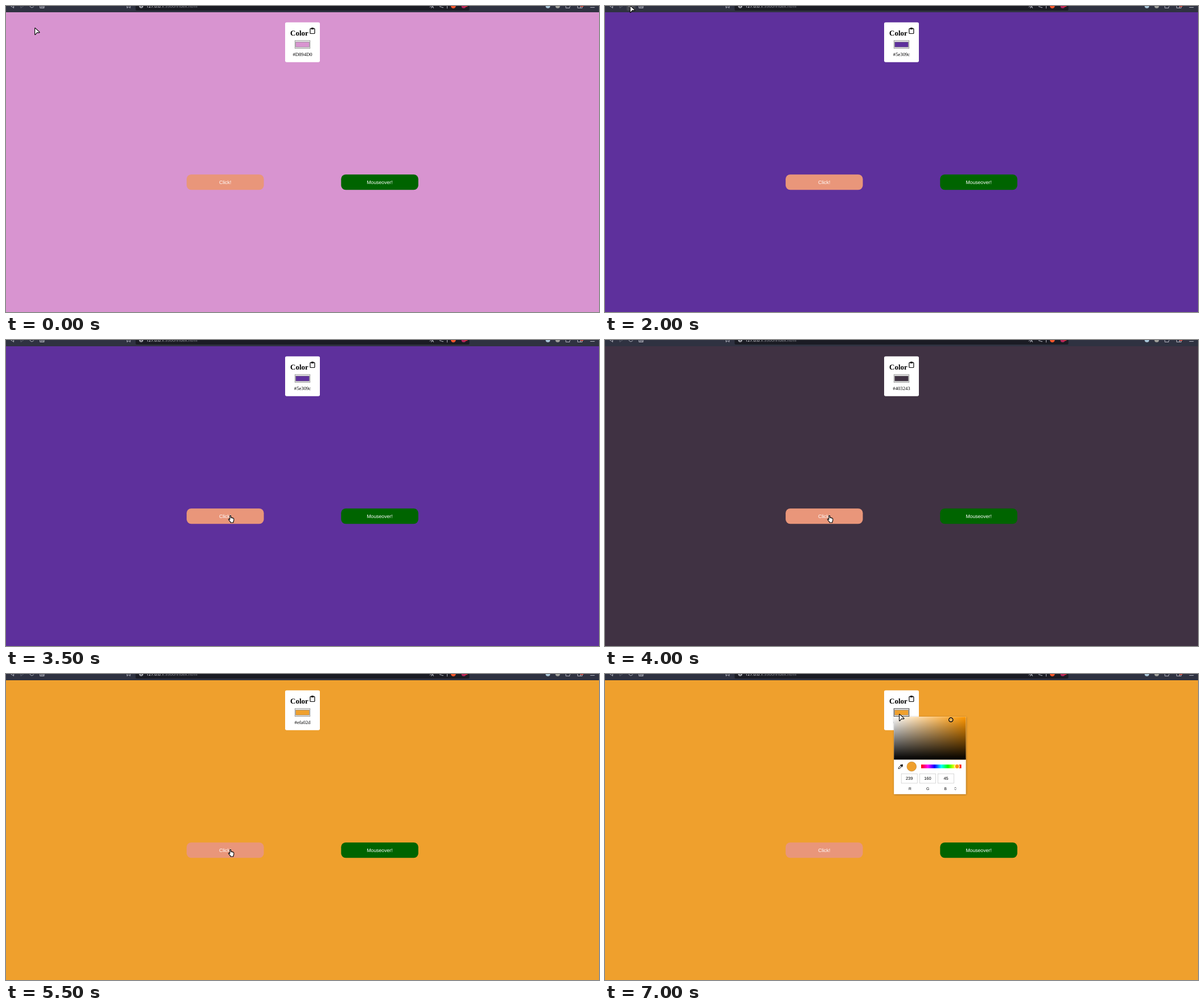
Write an HTML page that moves like this. It is 1041 px wide and 538 px high and loops after 8 s.

```html
<!DOCTYPE html>
<html lang="en">
<head>
<meta charset="utf-8">
<title>Color changer</title>
<style>
  html, body { margin: 0; width: 100%; height: 100%; overflow: hidden; }
  svg { display: block; width: 100%; height: 100%; }
  text { text-rendering: geometricPrecision; text-anchor: middle; }
  .sans { font-family: "Liberation Sans", Arial, sans-serif; }
  .serif { font-family: "Liberation Serif", "Times New Roman", serif; }
  .url { font: 7.4px "Noto Sans", sans-serif; text-anchor: start; }
  .icon { fill: none; stroke: #c3c5ce; stroke-width: .9; stroke-linejoin: round; stroke-linecap: round; }
  .cursor { fill: #fff; stroke: #000; stroke-width: 1.1; stroke-linejoin: round; }
</style>
</head>
<body>
<svg viewBox="0 0 1041 538">
  <defs>
    <linearGradient id="saturation"><stop stop-color="#fff"/><stop offset="1" stop-color="#ff9700"/></linearGradient>
    <linearGradient id="value" x2="0" y2="1"><stop stop-opacity="0"/><stop offset="1"/></linearGradient>
    <linearGradient id="hue"></linearGradient>
    <filter id="shadow" x="-10%" y="-10%" width="120%" height="120%">
      <feDropShadow dx=".5" dy=".8" stdDeviation="1.8" flood-opacity=".4"/>
    </filter>
  </defs>

  <rect id="page" width="1041" height="538"/>

  <!-- browser toolbar -->
  <rect width="1041" height="11" fill="#2f3241"/>
  <rect id="reloadHover" x="38" y="-6" width="15.5" height="14" rx="2" fill="#44464f"/>
  <path d="M227.500-5V6q0 2 2 2H811.500q2 0 2-2V-5z" fill="#1b1c24"/>
  <g class="icon">
    <path d="M13.500-4V3.500L8 -.5z"/>
    <path d="M26-4V3.500L31.500-.5z" opacity=".35"/>
    <path d="M48.500 1A3.500 3.500 0 1 1 48-3"/>
    <path d="M60-3H67V3.500H60zM62 3.500V0H65V3.500"/>
    <path d="M212.500-4V3.500L215.300 1.500L218 3.500V-4"/>
    <path d="M743.500-1L747-3M744 2L747-1M746.500 3.500L748.500-1L750.500 3.500M747.300 2H749.800"/>
    <path d="M761.500 1L766.500 2.600M761.500 0L767-2M766.500 2.600h1"/>
    <path d="M774.500-4V4"/>
    <path d="M982.800-2.500V3.500H989.500V1.500A1.300 1.300 0 0 0 989.500-1V-3"/>
    <path d="M1003.800-3H1011.500V3.500H1003.800zM1008.500-3V3.500"/>
    <path d="M1026-.5H1033M1026 2.500H1033"/>
  </g>
  <circle cx="237.300" cy="0" r="3.700" fill="#a4a5ac"/>
  <path d="M237.300-1V2" stroke="#1b1c24"/>
  <text class="url" x="246" y="2.800" fill="#e8e8ec">127.0.0.1<tspan fill="#8b8c94">:5500/index.html</tspan></text>
  <circle cx="785.300" cy="0" r="4.300" fill="#f0552b"/>
  <circle cx="803.500" cy="0" r="4" fill="#b3265c"/>
  <rect x="804.500" y="-5" width="6" height="6.500" rx="2" fill="#d8303a"/>
  <circle cx="951.300" cy="0" r="4" fill="#a9c5d6"/>
  <circle cx="968.500" cy="0" r="4" fill="#a0a09b"/>
  <rect x="1008" y="-5" width="6" height="6.500" rx="2" fill="#e0483c"/>

  <!-- color card -->
  <rect x="490" y="28.800" width="61" height="70" rx="2.700" fill="#fff"/>
  <text class="serif" x="515" y="52.300" font-size="13" font-weight="bold">Color</text>
  <g fill="none" stroke="#000" stroke-width="1.200">
    <rect x="533.900" y="39.700" width="8" height="8.800" rx="1"/>
    <rect x="536" y="38.400" width="3.800" height="2.400" rx=".6" fill="#000" stroke-width=".6"/>
  </g>
  <rect id="input" x="507.200" y="60.800" width="26.600" height="13.800" fill="#efefef"/>
  <rect id="swatch" x="508.700" y="63.200" width="23.600" height="9" stroke="#777" stroke-width=".6"/>
  <text id="code" class="serif" x="520.500" y="88" font-size="8.670"></text>

  <!-- buttons -->
  <g class="sans" font-size="8.670" fill="#fff">
    <rect x="317.100" y="296.200" width="135.500" height="27.100" rx="8.100" fill="#e9967a"/>
    <text x="384.800" y="312.800">Click!</text>
    <rect x="588.300" y="296.200" width="135.500" height="27.100" rx="8.100" fill="#006400"/>
    <text x="656" y="312.800">Mouseover!</text>
  </g>

  <!-- color picker popup -->
  <g id="picker">
    <rect x="507.200" y="75" width="126.300" height="136.200" fill="#fff" filter="url(#shadow)"/>
    <rect x="507.200" y="75.200" width="126.300" height="75.300" fill="url(#saturation)"/>
    <rect x="507.200" y="75.200" width="126.300" height="75.300" fill="url(#value)"/>
    <circle cx="607.200" cy="80.500" r="3.500" fill="#efa02d" stroke="#000" stroke-width="1.500"/>
    <circle cx="607.200" cy="80.500" r="2.300" fill="none" stroke="#fff" stroke-width=".6"/>
    <path d="M515.300 166.500V164.800L519.300 160.800L520.900 162.400L516.900 166.500z" fill="none" stroke="#000"/>
    <path d="M518.600 159.500L522.300 163.200M520.700 161.200L521.800 160" stroke="#000" stroke-width="1.300"/>
    <circle cx="521.500" cy="160.200" r="1.500"/>
    <circle cx="538.300" cy="162.700" r="8.300" fill="#efa02d" stroke="#b77a22" stroke-width=".6"/>
    <rect x="555" y="159.200" width="70.500" height="6.500" fill="url(#hue)"/>
    <circle cx="618" cy="162.400" r="4" fill="#ff9700" stroke="#fff" stroke-width="1.200"/>
    <g id="channels" class="sans"></g>
    <path d="M613.500 200.700L615 199.200L616.500 200.700M613.500 202.300L615 203.800L616.500 202.300" fill="none" stroke="#222" stroke-width=".8"/>
  </g>

  <path id="arrow" class="cursor" d="M.6 1.200Q.6 .3 1.400 .8L8.700 7.600Q9.400 8.700 8.200 8.900H4.800Q4.200 9 3.800 9.500L1.600 12.300Q.7 13 .6 11.900z"/>
  <path id="hand" class="cursor" d="M2.900 7.800V1.700Q2.900 .6 3.900 .6T4.900 1.700V4.800Q5 4 5.900 4.200T6.700 5Q6.900 4.400 7.600 4.600T8.400 5.500Q8.800 5 9.400 5.400T9.900 6.500V9Q9.900 10.700 9 11.700V13H4.200V11.900Q2.500 10.500 .8 8Q.3 7 1.200 6.700Q1.900 6.500 2.900 7.800z"/>
</svg>
<script>
const LOOP = 8000;
const $ = id => document.getElementById(id);

const colors = [[0, "#D894D0"], [2000, "#5e309c"], [4000, "#403243"], [5000, "#292486"], [5500, "#efa02d"]];
// start time, cursor shape, x, y
const moves = [
  [0, "arrow", 50, 38], [500, "arrow", 31.5, 14.5], [1000, "arrow", 43, 1.500], [1500, "arrow", 43.5, -1],
  [2500, "arrow", 92, 21.5], [3000, "hand", 401.5, 306.5], [3500, "hand", 390, 308],
  [6000, "arrow", 496, 145], [6500, "arrow", 516, 70]
];

$("hue").innerHTML = ["red", "magenta", "blue", "cyan", "lime", "yellow", "red"]
  .map((color, i) => `<stop offset="${i / 6}" stop-color="${color}"/>`).join("");

$("channels").innerHTML = [["R", 239], ["G", 160], ["B", 45]].map(([name, value], i) => {
  const x = 534.2 + i * 32.2;
  return `<rect x="${x - 14}" y="175.500" width="28" height="16.500" fill="#fff" stroke="#c8c8c8" stroke-width=".7"/>
    <text x="${x}" y="186.400" font-size="7.500">${value}</text>
    <text x="${535.5 + i * 31.1}" y="203.900" font-size="6.700">${name}</text>`;
}).join("");

const latest = (steps, t) => steps.filter(step => step[0] <= t).pop();
const show = (id, visible) => $(id).setAttribute("display", visible ? "inline" : "none");

function draw(now) {
  const t = now % LOOP;
  const color = latest(colors, t)[1];
  $("page").setAttribute("fill", color);
  $("swatch").setAttribute("fill", color);
  $("code").textContent = color;

  const [, shape, x, y] = latest(moves, t);
  for (const id of ["arrow", "hand"]) show(id, id === shape);
  $(shape).setAttribute("transform", `translate(${x} ${y})`);

  const focused = t >= 6500;
  $("input").setAttribute("stroke", focused ? "#444" : "#767676");
  $("input").setAttribute("stroke-width", focused ? 1 : .7);
  show("reloadHover", t >= 1500 && t < 3000);
  show("picker", t >= 7000);
}

function tick() {
  draw(performance.now());
  requestAnimationFrame(tick);
}
tick();
</script>
</body>
</html>
```
